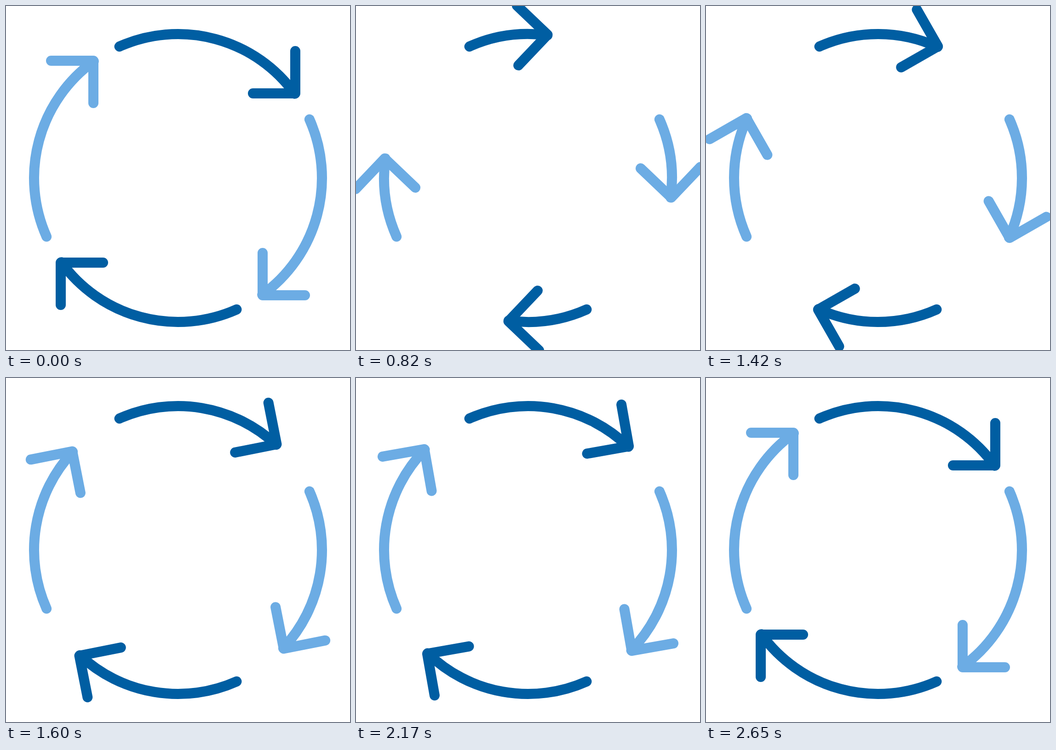
Write an HTML page that moves like this. It is 748x748 px and loops after 2680 ms.

```html
<!DOCTYPE html>
<html lang="en">
<head>
<meta charset="utf-8">
<title>Cycle arrows</title>
<style>
  html, body { margin: 0; height: 100%; overflow: hidden; background: #fff; }
  svg { display: block; width: 100vw; height: 100vh; }
</style>
</head>
<body>
<svg viewBox="-374 -374 748 748" fill="none" stroke-width="22" stroke-linecap="round" stroke-linejoin="round">
  <defs>
    <g id="arrow">
      <path id="shaft"/>
      <path id="head" d="M255-276V-184H163"/>
    </g>
  </defs>
  <use href="#arrow" stroke="#005ea2"/>
  <use href="#arrow" stroke="#6cace4" transform="rotate(90)"/>
  <use href="#arrow" stroke="#005ea2" transform="rotate(180)"/>
  <use href="#arrow" stroke="#6cace4" transform="rotate(270)"/>
</svg>
<script>
  const LOOP = 2680, HOLD = 280, STEP = 30;
  const RADIUS = 313, TAIL = -24.03, TIP = 54.18;
  const shaft = document.getElementById('shaft');
  const head = document.getElementById('head');

  const easeOut = u => 1 - (1 - u) ** 2.68;
  const easeInOut = u => u * u * (3 - 2 * u);

  // Head swing in degrees: [step, angle, easing towards it]
  const keys = [
    [0, 0],
    [28.5, -49, easeOut],
    [55, 6.6, easeInOut],
    [64.5, -10.15, easeInOut],
    [80, 0, easeInOut]
  ];

  function swing(step) {
    const i = Math.max(1, keys.findIndex(key => key[0] >= step));
    const [start, from] = keys[i - 1];
    const [end, to, ease] = keys[i];
    return from + (to - from) * ease((step - start) / (end - start));
  }

  // Point on the ring, angle in degrees clockwise from the top
  function ringPoint(degrees) {
    const a = degrees * Math.PI / 180;
    return `${RADIUS * Math.sin(a)} ${-RADIUS * Math.cos(a)}`;
  }

  function draw(now) {
    const t = now % LOOP;
    const angle = swing(t < HOLD ? 0 : Math.floor((t - HOLD) / STEP) + 1);
    shaft.setAttribute('d',
      `M${ringPoint(TAIL)}A${RADIUS} ${RADIUS} 0 0 1 ${ringPoint(TIP + angle)}`);
    head.setAttribute('transform', `rotate(${angle})`);
  }

  const begin = performance.now();
  function tick() {
    draw(performance.now() - begin);
    requestAnimationFrame(tick);
  }
  tick();
</script>
</body>
</html>
```
